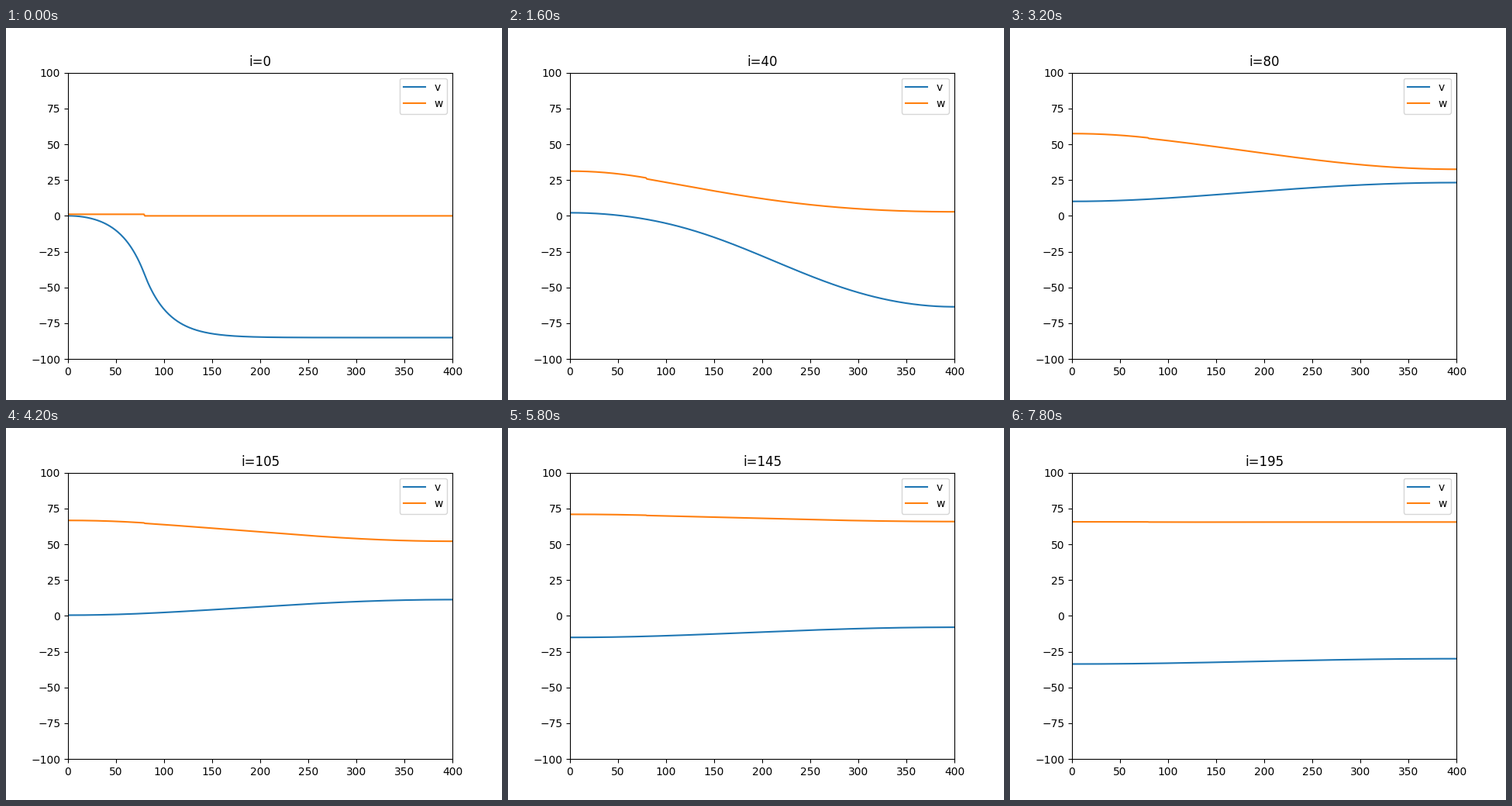
Recreate the animation shown at these times as a matplotlib script. Size 640 by 480 pixels, loop 8000 ms.

```python
import numpy as np
import matplotlib.pyplot as plt
from matplotlib.animation import FuncAnimation

# Excitable cable: modified FitzHugh-Nagumo reaction with implicit diffusion
REST, PEAK, THRESH_FRAC = -85.0, 40.0, 0.13
AMP = PEAK - REST
THRESH = REST + THRESH_FRAC * AMP
C1, C2, C3, B = 0.26, 0.1, 1.0, 0.013
DIFFUSION = 640.0
LENGTH, PULSE = 400, 80
STRIDE, FRAMES = 5, 40


def diffusion_step(n):
    """Inverse of (I - D d2/dx2) with no-flux ends."""
    lap = np.diag(np.full(n, -2.0)) + np.eye(n, k=1) + np.eye(n, k=-1)
    lap[0, 1] = lap[-1, -2] = 2.0
    return np.linalg.inv(np.eye(n) - DIFFUSION * lap)


def simulate(x):
    v = np.where(x < PULSE, 0.0, REST)
    w = np.zeros_like(v)
    spread = diffusion_step(len(x))
    states = []
    for _ in range(STRIDE * (FRAMES - 1) + 1):
        u = v - REST
        dv = C1 / AMP**2 * u * (v - THRESH) * (PEAK - v) - C2 / AMP * u * w
        dw = B * (u - C3 * w)
        v, w = spread @ (v + dv), w + dw
        states.append((v, w))
    return states[::STRIDE]


x = np.arange(LENGTH + 1)
states = simulate(x)

fig, ax = plt.subplots(figsize=(6.4, 4.8), dpi=100)
v_line, = ax.plot(x, states[0][0], label="v")
w_line, = ax.plot(x, states[0][1], label="w")
ax.set_xlim(0, LENGTH)
ax.set_ylim(-100, 100)
ax.legend(loc="upper right")
title = ax.set_title("i=0")


def update(k):
    v, w = states[k]
    v_line.set_ydata(v)
    w_line.set_ydata(w)
    title.set_text(f"i={k * STRIDE}")
    return v_line, w_line, title


anim = FuncAnimation(fig, update, frames=FRAMES, interval=200,
                     repeat=True, repeat_delay=0)
plt.show()
```
